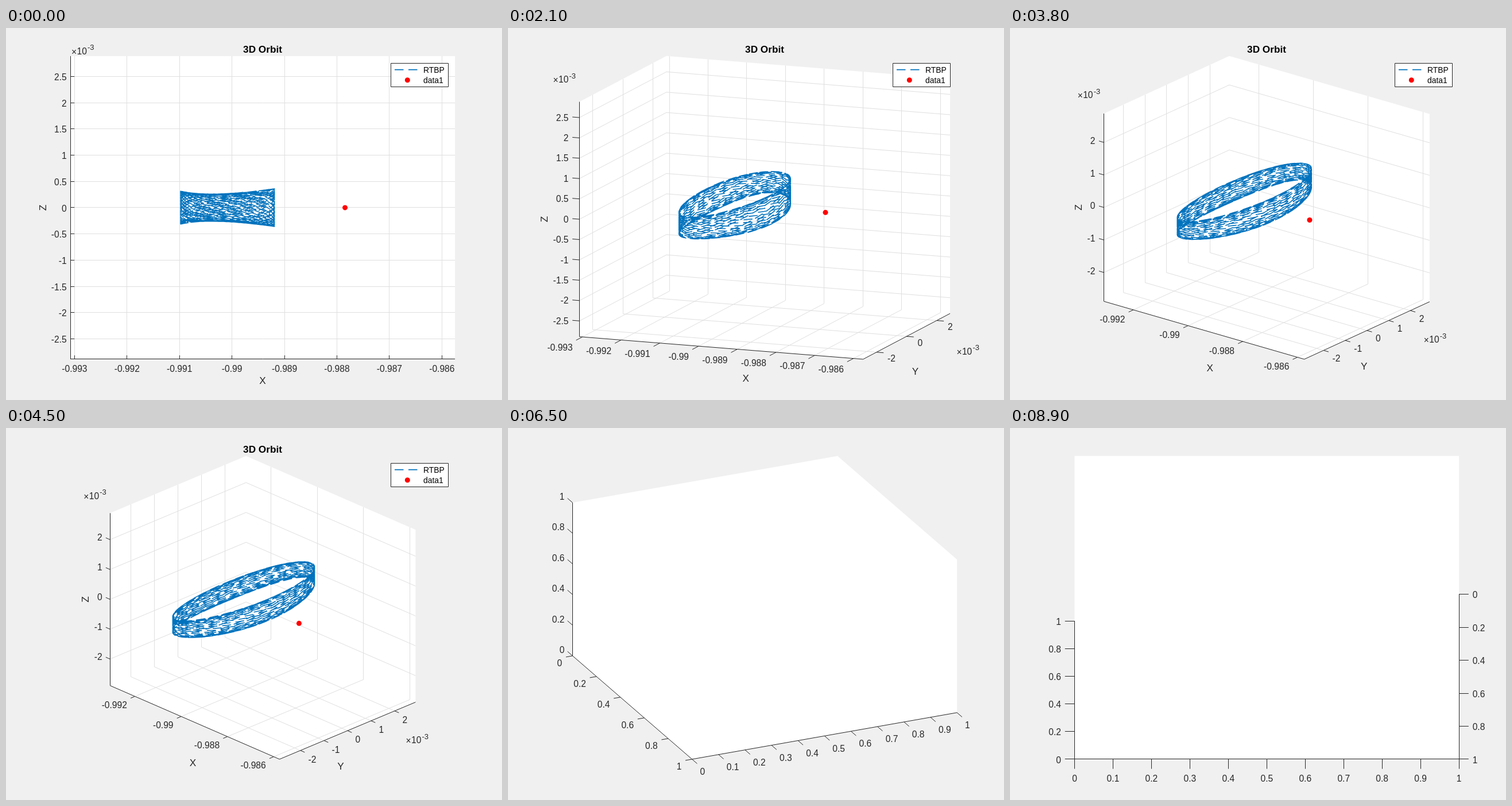
These frames come from a looping animation (864x648 px, 9000 ms). An HTML page with a canvas:

```html
<!DOCTYPE html>
<html lang="en">
<head>
<meta charset="utf-8">
<title>3D Orbit</title>
<style>
  html, body { margin: 0; width: 100%; height: 100%; overflow: hidden; background: #f0f0f0; }
  canvas { display: block; }
</style>
</head>
<body>
<canvas id="stage" width="864" height="648"></canvas>
<script>
const ctx = document.getElementById('stage').getContext('2d');
const STEPS = 90, STEP_MS = 100, CLEARED = 56;
const AREA = { cx: 447.3, cy: 312.92, w: 669.6, h: 528.1 };
const FONT = '"Liberation Sans", Arial, sans-serif';
const INK = '#262626', BLUE = '#0072bd', RED = '#ff0000';
const DASH = [15.5, 8.5], LINE_W = 1.6;

// Orbit limits are in thousandths.
const ORBIT_BOX = { x: [-993.0755, -985.7505], y: [-2.888, 2.888], z: [-2.888, 2.888] };
const UNIT_BOX = { x: [0, 1], y: [0, 1], z: [0, 1] };

const orbit = [];
const TURNS = 28, PER_TURN = 120;
for (let i = 0; i <= TURNS * PER_TURN; i++) {
  const a = i / PER_TURN * 2 * Math.PI, c = Math.cos(a), s = Math.sin(a);
  const height = 0.262 + 0.0225 * c + 0.0755 * c * c;
  orbit.push([-990.085 + 0.895 * c - 0.17 * s * s, 2.88 * s, height * Math.sin(0.9658 * a + 0.4)]);
}

const span = r => r[1] - r[0];
const mid = r => (r[0] + r[1]) / 2;
const snap = v => Math.floor(v) + 0.5;

function makeView(k, box, stretch) {
  const az = k * Math.PI / 2 / 89, el = k * 50 / 89 * Math.PI / 180;
  const ca = Math.cos(az), sa = Math.sin(az), ce = Math.cos(el), se = Math.sin(el);
  const w = span(box.x) * ca + span(box.y) * sa;
  const h = (span(box.x) * sa + span(box.y) * ca) * se + span(box.z) * ce;
  let sx = AREA.w / w, sy = AREA.h / h;
  if (!stretch) sx = sy = Math.min(sx, sy);
  const unit = {
    x: [ca * sx, sa * se * sy],
    y: [sa * sx, -ca * se * sy],
    z: [0, -ce * sy]
  };
  const m = [mid(box.x), mid(box.y), mid(box.z)];
  const at = (x, y, z) => {
    const dx = x - m[0], dy = y - m[1], dz = z - m[2];
    return [
      AREA.cx + dx * unit.x[0] + dy * unit.y[0],
      AREA.cy + dx * unit.x[1] + dy * unit.y[1] + dz * unit.z[1]
    ];
  };
  const px = {};
  for (const n of 'xyz') px[n] = Math.hypot(...unit[n]);
  return { at, unit, px, top: AREA.cy - h * sy / 2 };
}

function text(s, x, y, size = 15.6, align = 'center', weight = '') {
  ctx.font = `${weight} ${size}px ${FONT}`;
  ctx.textAlign = align;
  ctx.fillText(s, x, y + size * 0.36);
}

function exponent(x, y) {
  ctx.fillStyle = INK;
  text('×', x - 20, y + 1, 15.6, 'left');
  text('10', x - 10.5, y, 15.6, 'left');
  text('-3', x + 8, y - 6.5, 13, 'left');
}

// Upright and level lines sit on whole pixels; slanted ones are smoothed.
function line(p, q, color) {
  const fit = i => Math.abs(p[i] - q[i]) < 0.01 ? [snap(p[i]), snap(p[i])] : [p[i], q[i]];
  const [x0, x1] = fit(0), [y0, y1] = fit(1);
  ctx.strokeStyle = color;
  ctx.lineWidth = 1;
  ctx.beginPath();
  ctx.moveTo(x0, y0);
  ctx.lineTo(x1, y1);
  ctx.stroke();
}

function dot(x, y) {
  ctx.fillStyle = RED;
  ctx.beginPath();
  ctx.arc(x, y, 4.5, 0, 7);
  ctx.fill();
}

function ticksOf([lo, hi], step) {
  const out = [];
  for (let i = Math.ceil(lo / step - 1e-6); i * step <= hi + 1e-6; i++) out.push(+(i * step).toFixed(3));
  return out;
}

function walls(at, b) {
  const [x0, x1] = b.x, [y0, y1] = b.y, [z0, z1] = b.z;
  const corners = [[x0, y0, z0], [x1, y0, z0], [x1, y1, z0], [x1, y1, z1], [x0, y1, z1], [x0, y0, z1]];
  ctx.fillStyle = '#fff';
  ctx.beginPath();
  corners.forEach(c => ctx.lineTo(...at(...c)));
  ctx.fill();
}

function grid(at, b, ticks) {
  const [x0, x1] = b.x, [y0, y1] = b.y, [z0, z1] = b.z;
  const path = (...pts) => {
    for (let i = 1; i < pts.length; i++) line(at(...pts[i - 1]), at(...pts[i]), '#dfdfdf');
  };
  ticks.x.forEach(v => path([v, y0, z0], [v, y1, z0], [v, y1, z1]));
  ticks.y.forEach(v => path([x1, v, z0], [x0, v, z0], [x0, v, z1]));
  ticks.z.forEach(v => path([x0, y0, v], [x0, y1, v], [x1, y1, v]));
}

function axis(name, range, place, ticks, dir, len, opt = {}) {
  line(place(range[0]), place(range[1]), INK);
  const n = Math.hypot(...dir), d = [dir[0] / n, dir[1] / n];
  for (const v of ticks) {
    const p = place(v);
    const tip = [p[0] + d[0] * len, p[1] + d[1] * len];
    line(p, opt.inward ? [p[0] - d[0] * 6.7, p[1] - d[1] * 6.7] : tip, INK);
    const upright = Math.abs(d[0]) < 0.01, level = Math.abs(d[1]) < 0.01;
    const align = upright && opt.center ? 'center' : d[0] < 0 ? 'right' : 'left';
    const drop = level ? 1 : name === 'z' ? 1.5 : 9.5;
    ctx.fillStyle = INK;
    text(String(opt.scale ? +(v / opt.scale).toFixed(3) : v),
      tip[0] + d[0] * 6.8, tip[1] + d[1] * 6.8 + drop, 15.6, align);
  }
}

function dashed(draw) {
  ctx.strokeStyle = BLUE;
  ctx.lineWidth = LINE_W;
  ctx.lineJoin = 'round';
  ctx.setLineDash(DASH);
  ctx.beginPath();
  draw();
  ctx.stroke();
  ctx.setLineDash([]);
}

function legend() {
  ctx.fillStyle = '#fff';
  ctx.fillRect(670, 61, 101, 42);
  ctx.strokeStyle = INK;
  ctx.lineWidth = 1;
  ctx.strokeRect(670.5, 61.5, 100, 41);
  dashed(() => {
    ctx.moveTo(677, 72.6);
    ctx.lineTo(717, 72.6);
  });
  dot(699.3, 90.7);
  ctx.fillStyle = '#000';
  text('RTBP', 727, 73, 13.9, 'left');
  text('data1', 727, 91, 13.9, 'left');
}

function drawOrbit(at) {
  dashed(() => orbit.forEach(p => ctx.lineTo(...at(...p))));
  dot(...at(-987.846, 0, 0));
}

function axisTitles(k, at, b, len, zTickX, zWide) {
  const [x0, x1] = b.x, y0 = b.y[0], z0 = b.z[0];
  const xm = at(mid(b.x), y0, z0), ym = at(x1, 0, z0), zm = at(x0, y0, 0);
  ctx.fillStyle = INK;
  if (k) {
    text('X', xm[0] + 83 - 1.92 * k, xm[1] + 37.5 + 0.73 * k, 17.2);
    text('Y', ym[0] + 47 - 1.7 * k + 0.0087 * k * k, ym[1] + 52.5 + 0.55 * k - 0.0077 * k * k, 17.2);
  } else {
    text('X', 447, 614, 17.2);
  }
  ctx.save();
  ctx.translate(zm[0] - zTickX - (zWide ? 49 : 36), zm[1]);
  ctx.rotate(-Math.PI / 2);
  text('Z', 0, 0, 17.2);
  ctx.restore();

  if (!k) return exponent(134, 40);
  const zTop = at(x0, y0, b.z[1]), yEnd = at(x1, b.y[1], z0);
  exponent(zTop[0] - 26, zTop[1] - 14 - 2 * len);
  exponent(yEnd[0] - 2 + 6.5 * (len - 7.26), yEnd[1] + 66 - 3.5 * Math.max(0, len - 13));
}

function draw(k) {
  const isOrbit = k < CLEARED, flat = k === 0, side = k === STEPS - 1;
  const b = isOrbit ? ORBIT_BOX : UNIT_BOX;
  const { at, unit, px, top } = makeView(k, b, !isOrbit);
  const step = isOrbit ? {
    x: px.x >= 58 ? 1 : 2,
    y: px.y >= 35 ? 1 : px.y >= 12.5 ? 2 : 5,
    z: px.z >= 62 ? 0.5 : 1
  } : { x: 0.2, y: px.y >= 400 ? 0.1 : 0.2, z: 0.2 };
  const ticks = {};
  for (const n of 'xyz') ticks[n] = ticksOf(b[n], step[n]);

  ctx.fillStyle = '#f0f0f0';
  ctx.fillRect(0, 0, 864, 648);
  walls(at, b);
  if (isOrbit) grid(at, b, ticks);

  const [x0, x1] = b.x, [y0, y1] = b.y, z0 = b.z[0];
  const len = flat ? 0 : 0.025 * Math.max(...['x', 'y', 'z'].map(n => px[n] * span(b[n])));
  const back = v => [-v[0], -v[1]];
  // A foreshortened depth axis gives upright ticks.
  const steep = isOrbit && px.y < px.z / 3;
  const down = [0, 1];
  const xDir = side ? unit.y : steep ? down : back(unit.y);
  const yDir = steep ? down : unit.x;
  const zDir = side ? back(unit.y) : back(unit.x);

  axis('x', b.x, v => at(v, side ? y1 : y0, z0), ticks.x, xDir, len,
    { scale: isOrbit && 1000, center: true, inward: flat });
  if (!flat) axis('y', b.y, v => at(x1, v, z0), ticks.y, yDir, len, { center: side });
  axis('z', b.z, v => at(side ? x1 : x0, y0, v), ticks.z, zDir, len, { inward: flat });

  if (!isOrbit) return;
  drawOrbit(at);
  axisTitles(k, at, b, len, len * unit.x[0] / px.x, step.z < 1);
  ctx.fillStyle = '#000';
  text('3D Orbit', 447, top - 12.5, 17.2, 'center', 'bold');
  legend();
}

let shown = -1;
function tick() {
  const k = Math.floor(performance.now() / STEP_MS) % STEPS;
  if (k !== shown) draw(shown = k);
  requestAnimationFrame(tick);
}
tick();
</script>
</body>
</html>
```
